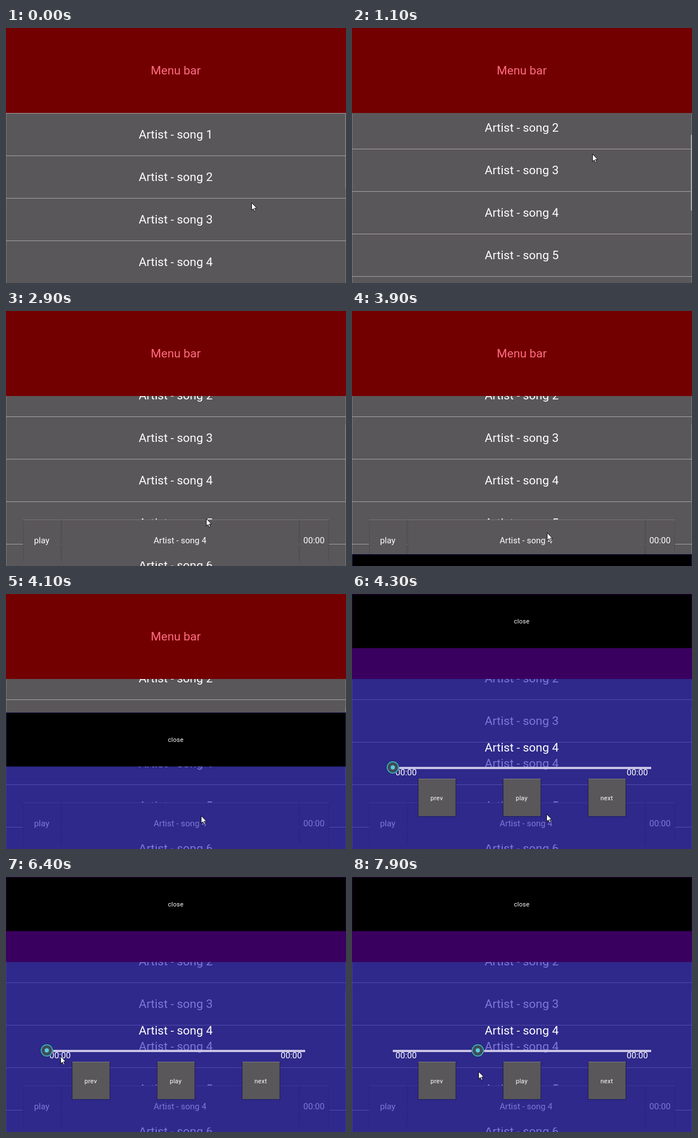
Recreate the animation shown at these times as an HTML page. Size 600 by 450 pixels, loop 8000 ms.

```html
<!DOCTYPE html>
<html lang="en">
<head>
<meta charset="utf-8">
<title>Music player</title>
<style>
  html, body { margin: 0; width: 100%; height: 100%; overflow: hidden; background: #000; }
  svg { display: block; width: 100%; height: 100%; }
  text { font-family: Roboto, "Liberation Sans", sans-serif; text-anchor: middle; }
  .small { letter-spacing: .3px; }
</style>
</head>
<body>
<svg viewBox="0 0 600 450" xmlns="http://www.w3.org/2000/svg">
  <defs><clipPath id="listArea"><rect y="150" width="600" height="300"/></clipPath></defs>
  <g clip-path="url(#listArea)"><g id="list"></g></g>
  <rect id="scrollbar" x="598" width="2" height="133.3" fill="#b3b3b3"/>
  <rect width="600" height="150" fill="#730000"/>
  <g id="menu"></g>
  <g id="miniBar"></g>
  <g id="player">
    <rect width="600" height="450" fill="#0800b6" fill-opacity=".53"/>
    <rect width="600" height="96" fill-opacity=".45"/>
    <rect x="1" y="1" width="598" height="94"/>
    <rect x="72" y="305" width="456" height="4" fill="#c8c3e4"/>
    <g id="controls"></g>
    <g id="knob">
      <circle r="11.7" fill-opacity=".3"/>
      <circle r="10" fill="#3f4a56" stroke="#3aaabb" stroke-width="1.8"/>
      <circle r="3.8" fill="#5cc8e0"/>
    </g>
  </g>
  <path id="cursor" d="M.5 .5V13.5L3.5 10.8L5.6 15.6L7.7 14.7L5.6 10H9.6Z" fill="#fff" stroke="#000" stroke-width=".9"/>
</svg>
<script>
const LOOP = 8000, STEP = 100, ROW = 75, SONGS = 9;
const $ = id => document.getElementById(id);

function add(parent, tag, attrs, content = "") {
  const el = document.createElementNS("http://www.w3.org/2000/svg", tag);
  for (const key in attrs) el.setAttribute(key, attrs[key]);
  el.textContent = content;
  return parent.appendChild(el);
}

// Text centred on (x, y), including the font's line height.
function label(parent, content, x, y, size, fill = "#fff") {
  const attrs = { x: x - .5, y: Math.round(y + size * .341), "font-size": size, fill };
  if (size < 12) attrs.class = "small";
  return add(parent, "text", attrs, content);
}

function box(parent, x, y, width, height, top, side) {
  add(parent, "rect", { x, y, width, height, fill: side });
  add(parent, "rect", { x: x + 1, y, width: width - 2, height, fill: "#5a575a" });
  add(parent, "rect", { x, y, width, height: 1, fill: top });
}

const ramp = (t, start, end) => Math.min(1, Math.max(0, (t - start) / (end - start)));

function ease(t, start, end) {
  const u = ramp(t, start, end);
  return u * u * (3 - 2 * u);
}

for (let i = 0; i < SONGS; i++) {
  const y = 150 + i * ROW;
  box($("list"), 0, y, 600, ROW, "#a3a1a3", "#7b797b");
  label($("list"), `Artist - song ${i + 1}`, 300, y + 37.5, 21);
}
label($("menu"), "Menu bar", 300, 75, 21, "#ff6b80");

const mini = $("miniBar");
function miniButton(content, left, right) {
  box(mini, left, 368, right - left, 74, "#777577", "#4e4c4e");
  return label(mini, content, (left + right) / 2, 405, 15);
}
const miniPlay = miniButton("play", 30, 97);
miniButton("Artist - song 4", 98, 517);
miniButton("00:00", 518, 570);

const controls = $("controls");
label(controls, "close", 300, 48, 11);
label(controls, "Artist - song 4", 300, 270.5, 21);
label(controls, "00:00", 96, 315, 15);
label(controls, "00:00", 504, 315, 15);
const [, mainPlay] = ["prev", "play", "next"].map((name, i) => {
  const x = 117 + i * 150;
  add(controls, "rect", { x: x - 1, y: 326, width: 68, height: 67, "fill-opacity": .3 });
  box(controls, x, 326, 66, 66, "#7d7b80", "#4e4c50");
  return label(controls, name, x + 33, 360, 11);
});

// Each pointer move eases from the previous resting place.
const home = { x: 433, y: 308 };
const moves = [
  { start: 200, end: 1100, x: 424, y: 222 },
  { start: 1100, end: 1900, x: 380, y: 295 },
  { start: 2100, end: 3300, x: 344, y: 391 },
  { start: 4200, end: 4900, x: 323, y: 338 },
  { start: 6000, end: 6480, x: 78, y: 314 },
  { start: 6800, end: 7400, x: 323, y: 353 },
  { start: 7400, end: 7900, x: 223, y: 343 }
];

function pointerAt(t) {
  return moves.reduce((from, to) => {
    const u = ease(t, to.start, to.end);
    return { x: from.x + (to.x - from.x) * u, y: from.y + (to.y - from.y) * u };
  }, home);
}

function scrollAt(t) {
  const glide = ramp(t, 1100, 1800);
  return 87 * ease(t, 200, 1100) + 27 * glide * (2 - glide);
}

function knobAt(t, pointerX) {
  if (t >= 6600) return pointerX - 1;
  return t < 6100 ? 72 + 5 * ramp(t, 4700, 5600) : 72;
}

function move(id, x, y) {
  $(id).setAttribute("transform", `translate(${x} ${y})`);
}

function draw(t) {
  const pointer = pointerAt(t), x = Math.round(pointer.x);
  const scroll = Math.round(scrollAt(t));
  move("cursor", x, Math.round(pointer.y));
  move("list", 0, -scroll);

  const active = t < 300 ? 0 : 1 - ramp(t, 2300, 2800);
  $("scrollbar").setAttribute("y", 150 + scroll * 300 / (ROW * SONGS));
  $("scrollbar").setAttribute("opacity", .2 + .7 * active);

  mini.style.display = t >= 2500 ? "" : "none";
  move("player", 0, Math.round(450 * (1 - ramp(t, 3881, 4290))));
  move("knob", knobAt(t, x), 306);

  const playing = t >= 5100 && t < 5800;
  miniPlay.textContent = mainPlay.textContent = playing ? "stop" : "play";
}

const start = performance.now();
function tick() {
  const t = (performance.now() - start + 1) % LOOP;
  draw(Math.floor(t / STEP) * STEP);
  requestAnimationFrame(tick);
}
tick();
</script>
</body>
</html>
```
